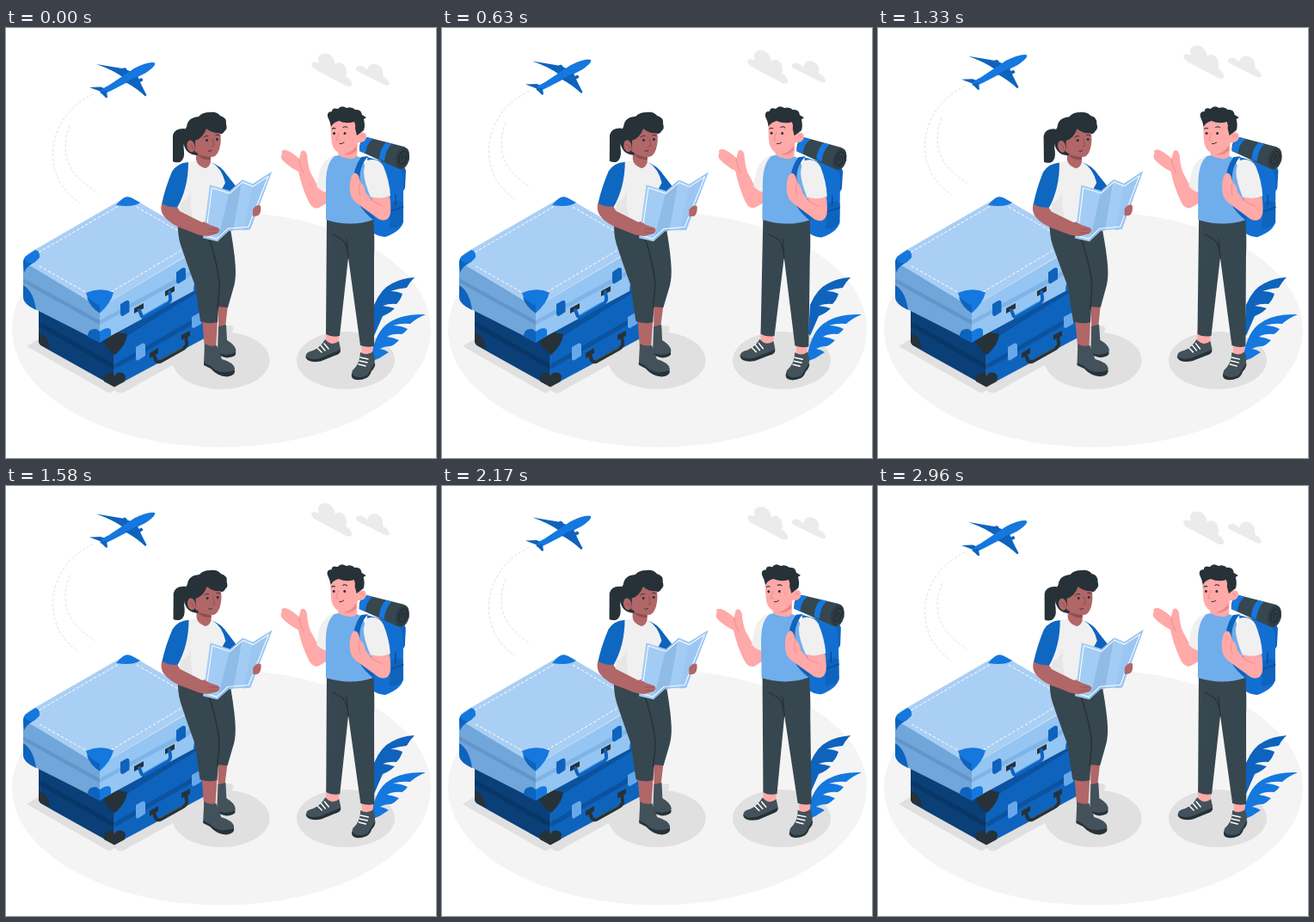
Animation, 500 px wide and 500 px high, one loop 3 s. Source, as an HTML page:

```html
<!DOCTYPE html>
<html lang="en">
<head>
<meta charset="utf-8">
<title>Travellers</title>
<style>
html, body { margin: 0; width: 100%; height: 100%; overflow: hidden; background: #fff; }
svg { display: block; width: 100vw; height: 100vh; }
.blue { fill: #1478df; }
.deep { fill: #0e63bd; }
.navy { fill: #0b529f; }
.ink { fill: #263238; }
.slate { fill: #37474f; }
.shoe { fill: #43525a; }
.pale { fill: #f0f0f0; }
.grey { fill: #e0e0e0; }
.cloud { fill: #ebebeb; }
.pink { fill: #ffa9a8; }
.brown { fill: #b16668; }
.line { fill: none; stroke-linecap: round; stroke-linejoin: round; }
.stitch { fill: none; stroke: #fff; stroke-dasharray: 3.5 2.2; }
</style>
</head>
<body>
<svg viewBox="0 0 500 500">
  <!-- floor -->
  <ellipse cx="250.500" cy="350.500" rx="243.500" ry="137" fill="#f4f4f4"/>
  <ellipse class="grey" cx="250" cy="386.500" rx="56.500" ry="33.500"/>
  <ellipse class="grey" cx="395" cy="386.500" rx="57" ry="33.500"/>
  <path class="grey" d="M24 370L60 348H240L262 346Q267 350 262 354L138 423Q134 426 129 423L126 421Q122 426 117 423Z"/>

  <!-- plants -->
  <g>
    <path class="deep" d="M426 355L428 322Q436 303 449 297Q460 291 475 290Q469 296 466 302Q456 303 447 306Q455 306 461 309Q459 316 454 321Q446 320 438 323Q446 324 452 326Q446 332 438 335L428 358Z"/>
    <path class="blue" d="M424 388Q427 358 442 345Q458 332 488 333Q478 337 470 344Q459 343 450 346Q460 346 467 350Q463 355 460 356Q450 355 443 359Q451 360 457 363Q451 369 447 370Q440 370 435 373Q441 374 445 377L434 384Z"/>
  </g>

  <!-- lower suitcase -->
  <g>
    <path d="M38 322L126 357V417L42 370Q38 368 38 364Z" fill="#0a3f78"/>
    <path d="M126 350L238 291V357L126 417Z" class="deep"/>
    <path d="M38 341L126 391V397L38 347Z" fill="#083767"/>
    <path class="navy" d="M126 391L238 327V333L126 397Z"/>
    <path class="navy" d="M118 353L228 296V304L128 366Z"/>
    <path class="ink" d="M112 359L126 353L141 356Q140 368 127 380Q114 372 112 359Z"/>
    <path class="ink" d="M38 354Q50 359 51 374L42 369Q38 367 38 364ZM113 407Q116 400 124 401L126 404L129 401Q137 399 139 405L138 411L126 417.500L114 411Z"/>
    <path d="M126 380V404" class="line" stroke="#3a7fc6" stroke-width=".6"/>
    <path d="M151 371L159 366.500Q162 366 162 369V381L153.500 386.500Q151 387 151 384ZM216 336L224 331.500Q227 331 227 334V344L218.500 349Q216 349 216 347Z" fill="#66a8ea"/>
    <path class="ink" d="M167 378L177 372V378L167 384ZM204 357L214 352V358L204 363Z"/>
    <path class="line" d="M172 380L174 386Q176 390 181 387L206 373Q211 370 210 365L209 358" stroke="#263238" stroke-width="4"/>
    <path class="line" d="M179 386L205 372" stroke="#455a64" stroke-width="1.300"/>
  </g>

  <!-- upper suitcase -->
  <g>
    <path d="M20 270L109 325V365L36 328Q20 321 20 313Z" fill="#71a6da"/>
    <path d="M109 325L229 254V300L109 365Z" fill="#95c5f2"/>
    <path d="M22 267Q23 264 28 261L137 198Q142 195 147 198L229 246Q232 250 229 253L114 322Q109 326 104 322L24 274Z" fill="#aacff4"/>
    <path d="M20 291L109 340V345L20 296Z" fill="#6296ca"/>
    <path d="M109 340L228 275V281L109 345Z" fill="#7fb4e6"/>
    <path class="stitch" d="M38 261L131 207M39 277L96 309M122 307L218 250M152 208L216 245"/>
    <path class="blue" d="M128 206Q134 199 138 197Q142 195 147 198L156 203Q148 209 128 206Z"/>
    <path class="blue" d="M22 266L34 258Q40 259 39 267Q35 272 29 275Q24 278 21 284L20 273Q20 269 22 266Z"/>
    <path class="deep" d="M21 268Q24 274 31 273.500Q24 277 21 284L20 273Z"/>
    <path class="blue" d="M93 308Q109 301 125 307.500Q122 320 109 331.500Q97 323 93 308Z"/>
    <path class="deep" d="M94 313L104 320Q109 323 109 323V331.500Q98 325 94 313Z"/>
    <path class="deep" d="M20 299Q32 306 35 328Q20 321 20 313ZM95 357Q96 349 105 350L109 353V366L95 359Z"/>
    <path class="blue" d="M109 353L114 350Q121 347 122 352V358L109 366Z"/>
    <path class="deep" d="M228 288Q218 292 218 306L229 301Z"/>
    <path class="deep" d="M133 321L140 317Q143 316 143.500 319V330L136 335Q133 335 133 332ZM198 284L205 279Q209 278 209 281V292L201 297Q198 298 198 294Z"/>
    <path class="ink" d="M149 326L160 320V326L149 332ZM185 306L196 300V306L185 312Z"/>
    <path class="line" d="M155 328L157 333Q158 338 163 335L187 321Q192 318 191 313L190 307" stroke="#0e63bd" stroke-width="4"/>
    <path class="line" d="M160 334L186 319" stroke="#2f8bea" stroke-width="1.200"/>
  </g>

  <!-- sky -->
  <g id="sky">
    <path class="cloud" d="M355 41Q359 38 364 41Q360 31 370 29.500Q380 29 383 42Q390 37 395 46Q397 52 395 56Q403 61 402 67Q398 70 391 65L359 48Q355 45 355 41Z"/>
    <path class="cloud" d="M407 46Q412 42 417 46Q420 50 421 47Q422 41 430 42Q440 45 438 56Q446 60 446 66Q443 68 438 65L422 57L410 51Q406 49 407 46Z"/>
    <path class="line" d="M101 77Q61 97 55 138Q51 179 85 203M74 114Q56 160 103 189" stroke="#dcdcdc" stroke-width=".9" stroke-dasharray="2.500 3"/>
    <path class="deep" d="M105 42L138 47.500L148 52L137 58Q125 49 105 42ZM97 69L110 68.500L117 71L113 75ZM134 48L138 46L141 48L138 50Z"/>
    <path class="blue" d="M110 74Q112 70 119 67L149 47Q166 38.500 173 40.500Q175 44 162 52.500L147 60L123 72.500Q115 77 110 76Z"/>
    <path class="deep" d="M139 63L153 56Q157 66 163.500 78L162 79.500Q152 70 139 63ZM109 74L117 73L118 81L116 81ZM153 60L158 58L159.500 61L156 63Z"/>
  </g>

  <!-- woman -->
  <g id="woman">
    <path class="brown" d="M247 322H258L255 348H247ZM228 338L246 340L244 372H231Z"/>
    <path class="shoe" d="M247 347L256 345L257 363Q267 369 267.500 375Q267 382 257 383Q250 381 246 377Z"/>
    <path class="ink" d="M246 377Q255 383 267 377Q269 382 257 383.500Q250 382 246 379Z"/>
    <path class="shoe" d="M231 367Q237 371 245 369L251 385Q265 389 266 396Q266 404 257 405Q246 404 238 394L230 390Z"/>
    <path class="ink" d="M230 389L238 393Q247 404 266 398Q267 404 257 405.500Q246 405 238 396L230 392Z"/>
    <path class="slate" d="M232 225L261 234Q267 268 267 284Q267 295 264 304L258 325L245 324Z"/>
    <path class="slate" d="M200 221Q199 240 203 252Q210 273 220 300L226 341Q236 345 246 342L249 298Q247 270 241 246L238 222Z"/>
    <path class="line" d="M236 244Q249 285 248 304L246 326" stroke="#263238" stroke-width="1.500"/>
    <path class="deep" d="M238 156Q250 160 257 171L268 185L257 193L244 181Z"/>
    <path class="pale" d="M211 156Q223 153 239 156Q251 163 255 180L247 195Q238 207 239 229Q217 229 200 221L201 207Z"/>
    <path d="M203 204Q214 198 215 188Q213 212 219 225L200 221Z" fill="#e6e6e6"/>
    <path class="brown" d="M221 140L238 146L238 156Q236 163 231 163Q222 160 221 153Z"/>
    <path d="M222 147L238 150V153Q228 154 222 147Z" fill="#8f4d50"/>
    <path class="ink" d="M194 125Q196 116 208 117L211 125Q205 133 207 143Q208 153 202 156Q196 157 194 155Z"/>
    <path class="ink" d="M206 130Q206 120 210 115Q211 104 224 103Q228 98 237 98Q245 97 249 102Q257 104 256 112Q258 117 254 120Q252 124 247 123L222 148Q207 147 206 130Z"/>
    <ellipse class="brown" cx="215" cy="137.500" rx="4.500" ry="7" transform="rotate(-12 215 137.500)"/>
    <path class="brown" d="M220 139V131Q229 128 233 117Q240 123 249 122Q251 130 248 141Q245 150 239 150Q227 150 219 143Z"/>
    <circle class="ink" cx="233.500" cy="130.500" r="1.500"/>
    <circle class="ink" cx="245.500" cy="129.500" r="1.500"/>
    <path class="line" d="M230 127Q232 124.500 235 125.500M244 124.500Q246 123.500 248 125M235 143Q237 144 239 142.500" stroke="#263238" stroke-width=".9"/>
    <path class="line" d="M240 129L242 137L239 138M214 136Q217 136 217 140" stroke="#8f4d50" stroke-width=".9"/>
    <path d="M212 156Q199 157 193 167Q185 186 181 205Q189 210 199 209Q212 186 212 156Z" fill="#0e67c1"/>
    <path class="brown" d="M181 204Q190 209 199 208L202 213L228 226Q236 223 246 231Q251 235 246 239L235 242Q224 241 210 235Q191 229 183 218Q179 212 181 204Z"/>
    <path class="brown" d="M285 209Q293 204 296 207Q297 215 293 218L284 220Z"/>
    <!-- map -->
    <g transform="translate(0 -.7)">
      <path d="M237 183L260 190L252 241L246 249L229 245Z" fill="#a3ccf4"/>
      <path d="M260 190L275 177L265 236L259 237L246 249Z" fill="#8fbbe7"/>
      <path d="M275 177L287 182L309 168L284 235L264 236Z" fill="#a3ccf4"/>
      <path d="M287 182L309 168L284 235L276 236Z" fill="#9bc6f1"/>
      <path class="line" d="M239.500 186.500L260 193L275 180L287 185L305 173L282 232L258 234L245 246L232 242Z" stroke="#fff"/>
    </g>
    <path class="brown" d="M220 229Q230 223 237 229L246 232Q251 235 246 239L235 242Q226 242 218 238ZM287 211Q292 204 296 207Q297 215 293 218L287 219Z"/>
    <path class="line" d="M236 234L246 234M236 238L245 238" stroke="#8f4d50" stroke-width=".7"/>
  </g>

  <!-- man -->
  <g id="man">
    <path class="deep" d="M449 158Q464 158 465 166L464 186Q461 193 456 190Z"/>
    <path d="M420 150L456 160Q462 168 462 180V225Q460 236 441 243Q431 242 427 238Z" fill="#126fd1"/>
    <path class="deep" d="M447 204Q456 198 462 203V226Q457 233 446 233Z"/>
    <path class="line" d="M448 213L462 208M453 194V206" stroke="#0a4b94" stroke-width="1.300"/>
    <path class="slate" d="M411 143Q410 130 420 127L463 138Q470 142 469 153Q465 166 457 164Z"/>
    <path class="blue" d="M411 143Q411 132 419 127L427 129Q419 134 418 146ZM434 152Q435 139 442 133L449 134.500Q441 142 440 155Z"/>
    <ellipse cx="461" cy="151" rx="7.500" ry="12.500" transform="rotate(16 461 151)" fill="#2e3c43"/>
    <path class="line" d="M461 153Q459 150 462 148Q466 149 464 156Q460 161 457 156Q456 147 462 143Q468 143 467 152" stroke="#1f292e" stroke-width="1"/>

    <path class="pink" d="M372 350L388 354L386 369L372 366ZM413 364H427L426 382H414Z"/>
    <path class="shoe" d="M371 362Q379 371 387 364L389 373Q389 378 382 380L366 387Q351 389 349 383Q347 377 357 375Q366 371 371 362Z"/>
    <path class="ink" d="M348.500 381Q352 387 365 384L389 374Q390 379 382 381L366 387.500Q351 390 348.500 383Z"/>
    <path class="shoe" d="M412 377Q420 382 427 376Q430 386 428 392Q424 398 421 405Q414 410 405 408Q400 405 403 398Q412 390 412 377Z"/>
    <path class="ink" d="M402 402Q408 409 420 404L429 389Q430 394 425 399Q423 405 419 407Q410 411 404 408Q401 406 402 402Z"/>
    <path class="line" d="M362 372L367 377M366 369L371 375M370 367L375 373M410 391L418 393M411 387L420 389M412 383L421 385" stroke="#fff" stroke-width="1.500"/>
    <path class="slate" d="M373 218L427 218Q429 245 428 266L428 370Q420 372 412 369L398 267L388 358Q379 360 372 356Z"/>
    <path class="line" d="M398 268Q397 252 391 246L380 240M396 245L398 266" stroke="#263238" stroke-width="1.200"/>

    <path class="pink" d="M372 187L361 181L354 168Q351 160 350 147Q347 140 343 144L341 152Q332 144 326 142Q319 141 321 146Q318 151 323 155Q330 162 340 167Q344 185 351 200Q356 212 364 209L374 203Z"/>
    <path class="line" d="M346 169Q342 162 341 153" stroke="#ec8787" stroke-width=".8"/>
    <path class="pale" d="M383 148Q370 151 365 165L361 184Q366 190 374 192L381 164Z"/>
    <path d="M382 149Q398 144 413 151Q420 162 423 182L427 223Q401 232 372 223V181Q372 157 382 149Z" fill="#70adeb"/>
    <path class="deep" d="M413 150L421 149Q409 163 412 181Q416 202 428 216V224Q406 207 404 184Q403 163 413 150Z"/>
    <path class="pale" d="M420 154Q433 150 439 161Q446 178 447 195Q437 201 424 197Q416 178 416 167Q417 158 420 154Z"/>
    <path class="pink" d="M424 196Q437 200 446 195Q448 207 447 216Q444 227 433 222L411 206Q401 200 400 190Q399 178 402 172Q406 165 410 172L412 179Q417 183 418 191L426 201Z"/>
    <path class="line" d="M412 180Q409 188 412 195M426 201L438 207" stroke="#ec8787" stroke-width=".8"/>

    <path class="pink" d="M386 140L409 131L408 149Q404 154 395 151Q388 150 386 146Z"/>
    <path d="M392 147Q402 145 407 137L408 142Q401 149 392 147Z" fill="#ec8787"/>
    <path class="pink" d="M378 107Q385 102 408 106L411 122Q420 119 419 128Q417 134 409 133Q404 145 392 147Q382 145 379 135Q377 120 378 107Z"/>
    <path class="ink" d="M374 103Q373 97 379 97Q379 92 386 94Q390 89 396 93Q402 91 406 95Q413 94 414 101L419 104L416 106Q418 114 416 119L412 122L408 125L406 117Q407 113 405 109Q396 112 387 108Q380 110 378 115Q377 109 374 103Z"/>
    <circle class="ink" cx="381.500" cy="122.500" r="1.500"/>
    <circle class="ink" cx="394" cy="122.500" r="1.500"/>
    <path class="line" d="M379 117.500Q381 115.500 383 117M392 115.500Q395 114 397 116M388 134.500Q391 135 393 133" stroke="#263238"/>
    <path class="line" d="M387 122L384 130L387 131M413 125Q416 124 416 127" stroke="#ec8787" stroke-width=".9"/>
  </g>
</svg>
<script>
const LOOP = 3000;
const set = (id, value) => document.getElementById(id).setAttribute("transform", value);

function draw(now) {
  const turn = now % LOOP / LOOP * 2 * Math.PI;
  set("sky", `translate(0 ${-4.75 * (1 - Math.cos(turn))})`);
  set("woman", `rotate(${Math.sin(2 * turn)} 245 250)`);
  set("man", `rotate(${0.8 * Math.sin(turn)} 395 250)`);
}

const start = performance.now();
function tick() {
  draw(performance.now() - start);
  requestAnimationFrame(tick);
}
tick();
</script>
</body>
</html>
```
